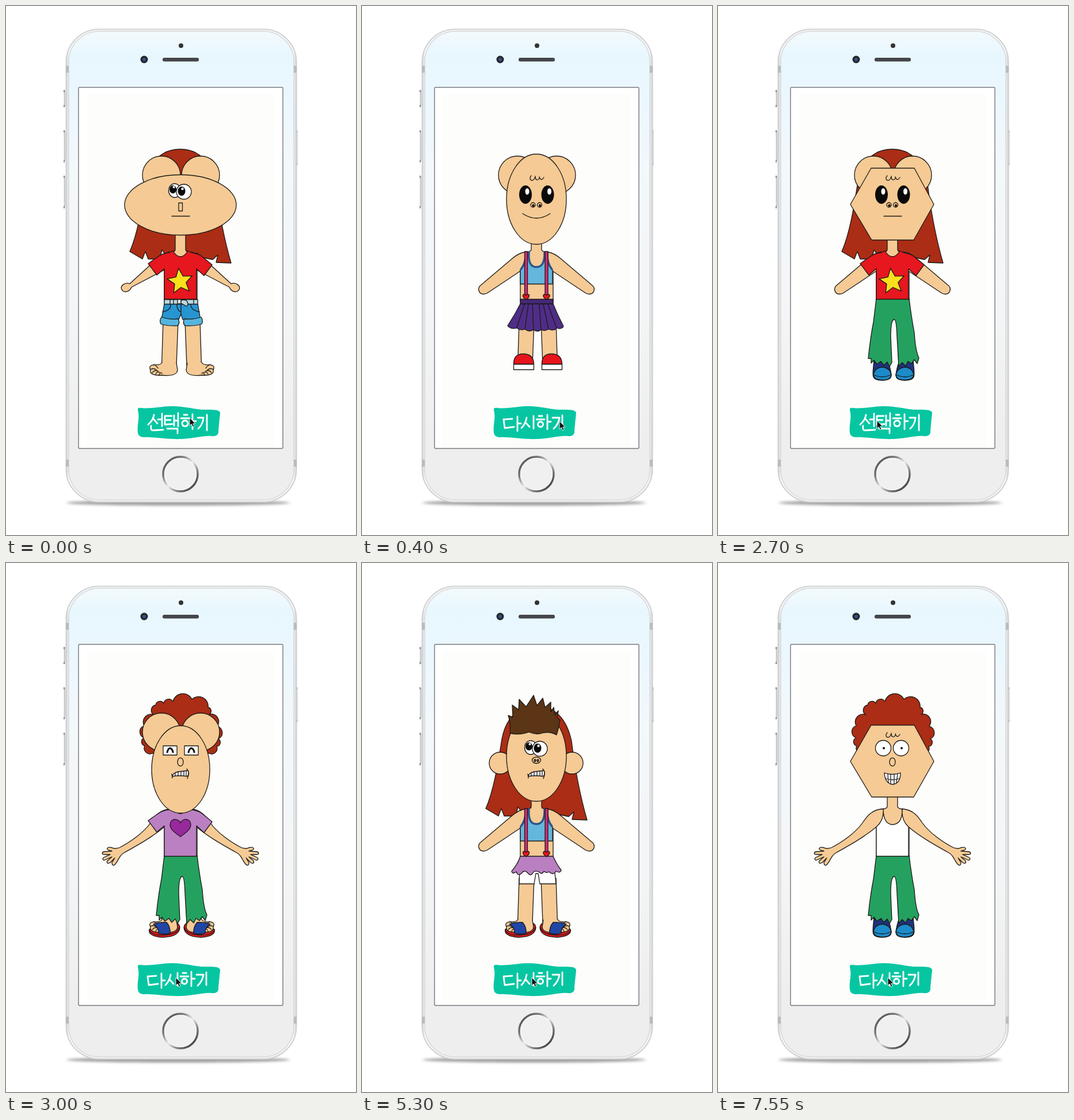
These frames come from a looping animation (608x920 px, 9550 ms). An HTML page:

```html
<!DOCTYPE html>
<html lang="ko">
<head>
<meta charset="utf-8">
<title>캐릭터 만들기</title>
<style>
html, body { margin: 0; width: 100%; height: 100%; overflow: hidden; background: #fff; }
svg { display: block; width: 100%; height: 100%; }
.ink { stroke: #1c1a18; stroke-width: 1.3; stroke-linejoin: round; stroke-linecap: round; }
.label { fill: none; stroke: #fff; stroke-width: 2.8; stroke-linecap: round; stroke-linejoin: round; }
</style>
</head>
<body>
<svg viewBox="0 0 608 920">
  <defs>
    <linearGradient id="glass" x2="0" y2="1">
      <stop offset="0" stop-color="#f3fafd"/><stop offset=".05" stop-color="#e8f7fe"/>
      <stop offset=".14" stop-color="#ebf7fe"/><stop offset=".3" stop-color="#f3f8fb"/>
      <stop offset=".6" stop-color="#f4f5f6"/><stop offset=".88" stop-color="#eeeeee"/><stop offset="1" stop-color="#eeeeee"/>
    </linearGradient>
    <linearGradient id="rim">
      <stop offset="0" stop-color="#cdcfd1"/><stop offset=".012" stop-color="#f6f6f6"/>
      <stop offset=".988" stop-color="#f6f6f6"/><stop offset="1" stop-color="#cdcfd1"/>
    </linearGradient>
    <linearGradient id="steel" x2="1" y2="1">
      <stop offset="0" stop-color="#444"/><stop offset=".28" stop-color="#777"/>
      <stop offset=".5" stop-color="#eee"/><stop offset=".72" stop-color="#777"/><stop offset="1" stop-color="#222"/>
    </linearGradient>
    <filter id="soft" x="-10%" y="-200%" width="120%" height="500%"><feGaussianBlur stdDeviation="3 2"/></filter>
  </defs>
  <rect width="608" height="920" fill="#fff"/>
  <ellipse cx="299" cy="864" rx="194" ry="5" fill="#a2a2a2" filter="url(#soft)"/>
  <path d="M102 146V175M102 217V270M102 296V350M505 217V276" stroke="#c9cbcd" stroke-width="3" fill="none"/>
  <path d="M101 146V150M101 172V176M101 216V220M101 268V272M101 295V299M101 348V352M505 216V220M505 273V277" stroke="#8d8f91" stroke-width="2" fill="none"/>
  <rect x="104.500" y="40.500" width="400" height="822" rx="57" fill="url(#rim)" stroke="#cfd1d3" stroke-width="2"/>
  <rect x="109" y="44" width="391" height="815" rx="53" fill="url(#glass)" stroke="#d6d8da" stroke-width="1.500"/>
  <path d="M106.500 104V116M502.500 104V116M106.500 789V801M502.500 789V801" stroke="#b9bbbd" stroke-width="5"/>
  <circle cx="304" cy="69" r="4" fill="#333"/>
  <circle cx="240" cy="93" r="6.500" fill="#25272b"/><circle cx="240" cy="93" r="3" fill="#34508c"/>
  <rect x="272" y="90" width="63" height="6.500" rx="3" fill="#45464b"/>
  <rect x="126" y="141.500" width="355" height="628" rx="2" fill="#fff" stroke="#77777c" stroke-width="1.400"/>
  <rect x="140" y="153" width="326" height="615" fill="#fdfdfb"/>
  <circle cx="303" cy="814" r="30" fill="#f0f0f0" stroke="url(#steel)" stroke-width="3.500"/>
  <circle cx="303" cy="814" r="27.500" fill="none" stroke="#fff" stroke-width="1"/>
  <g id="hero" class="ink"></g>
  <path fill="#06c6a2" d="M229 703Q228 698 235 699C250 701 265 697 285 696C310 695 330 703 350 702Q372 701 372 708C371 720 369 733 369 742Q367 749 358 748C340 747 330 752 305 753C280 754 255 749 240 750Q230 750 229 742C227 728 233 718 229 703Z"/>
  <path id="label" class="label" role="img"/>
  <g id="ring" fill="none">
    <circle cx="295.500" cy="721.500" r="18" stroke="#fff" stroke-opacity=".55" stroke-width="5"/>
    <circle cx="295.500" cy="721.500" r="17.500" stroke="#111" stroke-width="2.500"/>
  </g>
  <path id="cursor" d="M0 0V14L3.200 11L5.500 16L8 15L5.800 10.200H10Z" fill="#111" stroke="#fff" stroke-width=".9"/>
</svg>
<script>
const $ = id => document.getElementById(id);
const skin = '#f5ca94', rust = '#ab2d15', none = '';

const p = (d, fill = 'none', more = '') => `<path d="${d}" fill="${fill}" ${more}/>`;
const oval = (x, y, rx, ry = rx, fill = skin, more = '') =>
  `<ellipse cx="${x}" cy="${y}" rx="${rx}" ry="${ry}" fill="${fill}" ${more}/>`;
const dot = (x, y, rx, ry = rx, fill = '#0a0a0a') => oval(x, y, rx, ry, fill, 'stroke="none"');
const box = (x, y, w, h, fill = 'none') => `<rect x="${x}" y="${y}" width="${w}" height="${h}" fill="${fill}"/>`;
const pair = (art, sum = 606) => art + `<g transform="translate(${sum}) scale(-1 1)">${art}</g>`;
const twice = (art, dx) => art + `<g transform="translate(${dx})">${art}</g>`;

function scallops(pts, fill) {
  const arcs = pts.slice(1).map(([x, y], i) => {
    const r = Math.hypot(x - pts[i][0], y - pts[i][1]) * .53;
    return `A${r} ${r} 0 0 1 ${x} ${y}`;
  });
  return p(`M${pts[0]}${arcs.join('')}Z`, fill);
}

function star(cx, cy, R, r, turn) {
  const pts = Array.from({ length: 10 }, (_, i) => {
    const a = (i * 36 - 90 + turn) * Math.PI / 180, k = i % 2 ? r : R;
    return [cx + k * Math.cos(a), cy + k * Math.sin(a)].map(v => v.toFixed(1));
  });
  return p(`M${pts.join('L')}Z`, '#f8e01c');
}

const heart = (x, y, s, fill) => p(
  `M${x} ${y + 15 * s}C${x - 10 * s} ${y + 8 * s} ${x - 18 * s} ${y + 2 * s} ${x - 18 * s} ${y - 6 * s}` +
  `C${x - 18 * s} ${y - 17 * s} ${x - 4 * s} ${y - 18 * s} ${x} ${y - 9 * s}` +
  `C${x + 4 * s} ${y - 18 * s} ${x + 18 * s} ${y - 17 * s} ${x + 18 * s} ${y - 6 * s}` +
  `C${x + 18 * s} ${y + 2 * s} ${x + 10 * s} ${y + 8 * s} ${x} ${y + 15 * s}Z`, fill);

const tee = fill => p('M283 429L290 426Q303 446 316 426L323 429Q335 431 341 436L358 450L344 469L331 457V510H275V457L262 468L247 448L264 436Q272 430 283 429Z', fill);
const foot = p('M271 620Q268 625 257 624Q247 625 251 633C249 641 260 643 270 642Q297 645 298 633L296 621', skin);
const toes = p('M251 632Q257 629 261 633M254 638Q258 632 264 635M260 641Q261 635 267 637M266 642Q267 636 271 639M257 624Q262 626 264 630');

const torso =
  p('M294 390V427L283 428L275 459V515H332V459L323 428L312 427V390Z', skin, 'stroke="none"') +
  p('M294 390V424Q293 428 283 428M275 459V515M332 459V515M312 390V424Q313 428 323 428');
const legs = pair(p('M273 548L270.500 625H296L299 548', skin), 610);

// Listed from the back layer to the front one.
const slots = {
  back: [
    p('M303 249C336 249 356 272 364 310C369 350 376 395 391 447L365 446L368 433L359 441L340 437L332 430H275L271 424L267 440L247 440L242 427L237 440L215 427C229 395 236 350 243 306C250 270 270 249 303 249Z', rust),
    scallops([[254, 331], [241, 318], [240, 304], [240, 283], [257, 264], [260, 247], [274, 244], [290, 241],
      [323, 237], [351, 251], [353, 263], [367, 284], [369, 306], [366, 319], [353, 331]], rust),
    none
  ],
  arms: [
    pair(p('M283 428Q266 433 250 451L215 483C206 480 198 487 201 493C205 500 215 497 218 489L275 459', skin)),
    pair(p('M283 428C274 429 267 434 260 440L207 485C199 491 203 501 211 501Q215 501 218 499L275 461', skin)),
    pair(p('M283 428C267 430 259 440 251 452C239 469 215 486 197 495Q188 498 184 495C175 493 173 498 180 500L184 501L171 502C166 503 166 507 171 507L181 507L170 512C166 515 169 518 173 516L184 511L176 518C174 523 178 523 181 521L189 513L184 521C184 528 189 526 191 522C196 516 197 508 205 504C230 490 255 476 275 459', skin))
  ],
  feet: [
    pair(foot + toes, 611),
    twice(p('M263.5 623Q263 605 280 605Q298 605 298.500 623Z', '#e6151b') + box(263.5, 623, 35, 9.5, '#fff'), 49),
    pair(
      p('M249 637Q246 649 272 651Q301 650 302 634Q301 626 294 626Z', '#e3191d') +
      p('M249 639Q254 648 274 647Q298 646 301 634') + foot + toes +
      p('M256 628Q266 624 279 625Q286 633 285 644Q275 647 265 644Q266 634 256 628Z', '#2045a4'), 611),
    pair(
      p('M271 619Q268 640 270 645Q272 651 285 651Q301 651 301 642Q300 632 296 620Z', '#1e327f') +
      p('M270 640Q274 628 286 628Q299 630 301 641Q300 650.500 285 650.500Q270 650 270 640Z', '#1c8bca') +
      p('M270 641Q285 649 301 641'), 610)
  ],
  bottom: [
    p('M275 518H333L338 546L307 545L304 536L300 545L270 546Z', '#2795cf') +
    p('M304 519V537M286 519Q287 529 272 532M321 519Q321 529 336 532M297 519Q297 530 304 532') +
    pair(p('M270 541Q285 546 299 544Q303 551 298 556Q282 557 269 553Q266 547 270 541Z', '#55b5de'), 609) +
    box(275, 510.5, 58, 8, '#b9d9df') + p('M285 510V518M291 510V518M326 510V518') +
    box(298, 510, 6, 8, '#e4eef0') + p('M304 512Q314 509 316 517Q315 525 310 520L304 517Z', '#b9d9df'),
    p('M275 518H332Q340 538 350 557Q347 563 338 560Q333 566 324 562Q318 566 311 563Q305 568 298 563Q290 568 283 562Q275 565 269 560Q259 563 253 556Q265 538 275 518Z', '#4f2d87') +
    p('M282 519L269 559M289 519L283 562M296 519L298 563M308 519L311 563M315 519L324 562M323 519L338 560') +
    box(275, 510, 57, 8, '#452879'),
    p('M274 530L273 558H299L302 540H306L309 558H337L334 530Z', '#fff') +
    p('M275 510H332Q338 524 346 534Q345 540 337 536Q332 544 325 537Q320 540 316 536Q313 543 307 537Q299 534 297 539Q293 546 287 538Q281 533 277 540Q271 545 268 537Q261 542 260 536Q271 523 275 510Z', '#b97fc1'),
    p('M275 509H332Q336 542 341 568Q343 600 349 612L346 622L341 615L336 622L330 618L326 626L320 620L314 627L311 575Q310 545 306 545Q300 546 300 575L302 620L298 627L294 619L288 625L283 618L276 623L271 616L266 621V613L261 613Q265 575 270 550Z', '#25a15f')
  ],
  top: [
    tee('#e6171e') + star(302.5, 479, 23, 10.5, -7),
    p('M285 428Q285 448 275 459V483.500H331V459Q320 448 320 428H317Q318 453 303 454Q288 453 289 428Z', '#64b6dc') +
    p('M290 428Q288 454 303 454Q318 454 317 428M284 430Q285 447 276 458M322 430Q321 447 330 458', 'none', 'stroke="#2a5689" stroke-width="3.500"') +
    box(282.5, 427, 5, 77, '#d62a78') + box(318, 427, 5, 77, '#d62a78') +
    heart(285, 506, .31, '#e6171e') + heart(320.5, 506, .31, '#e6171e'),
    tee('#bb80c2') + heart(303, 461, 1, '#97299c'),
    p('M287 427Q289 447 275 459V510H331V459Q318 447 320 427Q321 454 303 455Q287 454 287 427Z', '#fff')
  ],
  ears: [
    twice(oval(270, 294, 33), 68),
    twice(oval(240, 348, 19), 125),
    none
  ],
  face: [
    oval(303, 346, 97, 52.5),
    oval(303, 336, 52, 78.5),
    oval(303.5, 359, 50.5, 76),
    p('M266 282H341L375 345L340 407H267L230 345Z', skin)
  ],
  front: [
    none,
    p('M294 295C288 302 296 306 299 301Q301 298 301 296Q301 304 306 302Q309 300 308 297Q311 306 316 298'),
    p('M257 296Q259 280 254 265L262 268L261 247L272 255L273 237L285 250L298 230L304 248L314 235L318 251L328 242V259L333 251L335 264L341 257L339 269L344 273Q342 287 338 299Q327 293 316 295Q304 300 290 294Q274 300 257 296Z', '#5b3515')
  ],
  eyes: [
    oval(293, 321, 10.5, 12, '#fff') + oval(309, 323, 13, 13, '#fff') + dot(290, 319, 6, 7) + dot(305, 322, 6.5, 8) +
    dot(291.5, 315, 2, 2, '#fff') + dot(306.5, 318, 2.2, 2.2, '#fff'),
    twice(dot(284, 328, 11, 16) + dot(287, 322.5, 3.5, 5.5, '#fff'), 38.5),
    twice(box(273, 318, 24, 16, '#fff') + p('M280 329Q282 322 285 322Q289 323 290 329', 'none', 'stroke-width="3.200"'), 37),
    twice(oval(287, 322, 13.5, 13.5, '#fff') + dot(288, 322, 2), 31)
  ],
  nose: [
    box(300, 342.5, 6.5, 14),
    twice(oval(297, 346, 4, 4, 'none') + dot(297.5, 347, 2.2), 11.5),
    oval(303, 346, 5, 7.2, 'none'),
    oval(303, 343, 7.5, 5.5, 'none') + twice(oval(300.5, 343.5, 1.5, 2, '#7a4a2a'), 5)
  ],
  mouth: [
    p('M288 365.500H319'),
    p('M279 361Q303 377 327 361'),
    p('M289 371Q290 365 299 363L316 361Q319 366 315 371Q300 369 289 371Z', '#fff') +
    p('M294 366V370M299 363V370M304 363V370M309 362V370M313 362V370M288 367L289 374M314 358Q320 364 315 375'),
    p('M289 365Q303 370 317 365Q317 384 303 385Q290 383 289 365Z', '#fff') +
    p('M291 375Q303 379 315 375M295 367L296 382M300 368V385M306 368V385M312 367L310 382')
  ]
};
const names = Object.keys(slots);

const labels = {
  '선택하기': 'M257 711Q256 720 247 728M256 718L263 726M264 719H270M271 709V731M252 730Q251 738 255 738L273 737' +
    'M288 713H276V728L289 727M277 720H286M292 712V730M292 721H298M299 708V731M280 735H298V743' +
    'M309 711H315M304 717H318M311 721A5 5 0 1 0 311.100 721M324 710V736M324 722H330M333 716H343Q342 728 334 735M349 711V738',
  '다시하기': 'M261 718L246 719L248 734L264 732M270 714V739M270 726H276M286 716Q284 727 277 734M284 724L291 732M298 713V735' +
    'M307 713H313M303 719H317M310 723A4.500 4.500 0 1 0 310.100 723M322 711V736M322 723H328M331 716H343Q341 728 333 735M348 712V734'
};
const pick = '선택하기', again = '다시하기';

// One digit per slot, in the order of the layers.
const looks = ['00000000000', '21111011111', '12232020222', '01221112032', '12333231323'];

const LOOP = 9550, STEP = 50;
const spins = [
  { from: 0, to: 400, first: 0, last: 1, a: [319, 716], b: [343, 722] },
  { from: 2400, to: 3000, first: 1, last: 2, a: [257, 721], b: [295, 721] },
  { from: 5000, to: 5300, first: 2, last: 3, a: [295, 721], b: [295, 721], tap: true },
  { from: 7300, to: 7550, first: 3, last: 4, a: [295, 721], b: [295, 721], tap: true }
];

function shuffled(seed) {
  return names.map((name, i) => {
    const v = Math.sin(seed * 12.9898 + i * 78.233) * 43758.5453;
    return Math.floor((v - Math.floor(v)) * slots[name].length);
  }).join('');
}

function draw(look) {
  const art = {};
  names.forEach((name, i) => art[name] = slots[name][look[i]]);
  const { back, arms, ...rest } = art;
  return back + torso + arms + legs + Object.values(rest).join('');
}

let shown = '';
function render(t) {
  const spin = spins.findLast(s => t >= s.from);
  const step = Math.floor((t - spin.from) / STEP);
  const done = t >= spin.to;
  const tap = Boolean(spin.tap) && step === 0;
  const look = done ? looks[spin.last] : step ? shuffled(spin.from + step) : looks[spin.first];
  const text = done || tap ? again : pick;
  const k = Math.min(1, step * STEP / (spin.to - spin.from));
  const [x, y] = spin.a.map((v, i) => v + (spin.b[i] - v) * k);

  if (look !== shown) $('hero').innerHTML = draw(shown = look);
  $('label').setAttribute('d', labels[text]);
  $('label').setAttribute('aria-label', text);
  $('ring').setAttribute('visibility', tap ? 'visible' : 'hidden');
  $('cursor').setAttribute('transform', `translate(${x} ${y})`);
}

const start = performance.now();
function tick() {
  render((performance.now() - start) % LOOP);
  requestAnimationFrame(tick);
}
tick();
</script>
</body>
</html>
```
